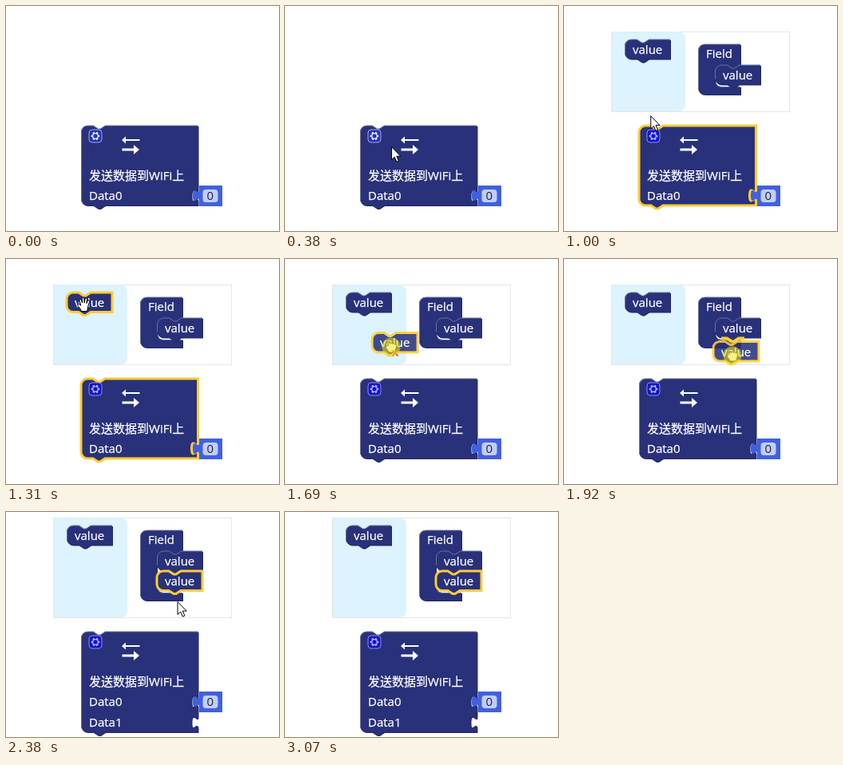
An HTML page for the animation above (3930 ms loop, 342 by 282 pixels).

```html
<!DOCTYPE html>
<html lang="zh-CN">
<head>
<meta charset="utf-8">
<title>Block editor</title>
<style>
html, body { margin: 0; width: 100%; height: 100%; overflow: hidden; background: #fff; }
svg { display: block; width: 342px; height: 282px; }
text { font: 15px "Open Sans", "Noto Sans CJK SC", "Noto Sans CJK", sans-serif; fill: #fff; stroke: #fff; stroke-width: .25px; }
.body { fill: #29317a; }
.dark { fill: #212762; }
.edge { fill: none; stroke: #6a709f; }
.sel .body { stroke: #fc3; stroke-width: 3; }
.sel .edge, .sel .dark { display: none; }
</style>
</head>
<body>
<svg viewBox="0 0 342 282">
  <g id="bubble">
    <rect id="frame" x="59.5" width="223" fill="#fff" stroke="#e6e6e6"/>
    <path id="tray" fill="#ddf3fd"/>
    <g id="spare" class="block"><text x="10" y="18">value</text></g>
    <g id="field" class="block"><text x="178">Field</text></g>
    <g id="first" class="block"><text x="10" y="18">value</text></g>
    <g id="second" class="block sel"><text x="10" y="18">value</text></g>
    <path id="hint" d="M197 99.5h7l6 4h3l6-4h7" fill="none" stroke="#fc3" stroke-width="4"/>
  </g>
  <g id="main" class="block">
    <g transform="translate(104 155)">
      <rect id="plate" width="16" height="16" rx="4"/>
      <g id="gear" fill="none" stroke="#fff">
        <circle cx="8" cy="8" r="4.5" stroke-width="1.6" pathLength="12" stroke-dasharray="1 1" stroke-dashoffset=".5"/>
        <circle cx="8" cy="8" r="3.3" stroke-width="1.3"/>
      </g>
    </g>
    <g fill="#fff">
      <path d="M145 168l5-4.500v3.500h17.500v2h-17.500v3.500z"/>
      <path d="M145.500 178.500h14.500v-4.500l7 6-7 6v-4.500h-14.500z"/>
    </g>
    <text x="104" y="218">发送数据到WiFi上</text>
    <text x="104" y="243">Data0</text>
    <text id="extra" x="104" y="269">Data1</text>
    <path d="M242 225h29v26h-29v-6c0-10-8 8-8-7.500s8 2.500 8-7.500z" fill="#4160e0"/>
    <rect x="246.500" y="230" width="19" height="16" rx="4" fill="#c3cdf6"/>
    <text x="251.500" y="243" style="fill:#1c2540;stroke:none">0</text>
  </g>
  <path id="arrow" d="M.5.5v16l3.700-3.400 2.600 6 2.600-1.100-2.600-5.900h5z" fill="#fff" stroke="#000"/>
  <path id="open" d="M-3 8.500C-4 5-8 2-7.500.3S-5-.5-3.800 1.300L-5.500-5c-.3-2 2-2.300 2.500-.5l1 3.500-.2-5.500c0-1.800 2.400-1.800 2.500 0l.3 5.300 1-4.800c.4-1.700 2.600-1.300 2.400.4l-.6 5.200 1.400-3c.7-1.600 2.700-.8 2.200.9L5 3.500l-.8 5z" fill="#fff" stroke="#000"/>
  <g id="grab">
    <path d="M-3 7C-4 4-7 2-6.500 0s2-2 2.700-1c-1.200-3 1.300-4 2.300-2.500.5-1.800 2.600-1.500 3 0 .8-1.300 2.700-.8 2.800.7C6-3.500 7-2 6.500 0L4.500 7z" fill="#fff" stroke="#222" stroke-width=".8"/>
    <path id="cross" d="M1.500 4.500l7 7m0-7l-7 7" stroke="#e8602a" stroke-width="2"/>
  </g>
  <circle id="ring" r="11.500" fill="#f0e614" fill-opacity=".55"/>
</svg>
<script>
const LOOP = 3930;
const $ = id => document.getElementById(id);
const show = (id, on) => { $(id).style.display = on ? '' : 'none'; };
const move = (id, x, y) => $(id).setAttribute('transform', `translate(${x} ${y})`);
const select = (id, on) => $(id).classList.toggle('sel', on);
const setPath = (id, body, edge) => {
  const [dark, face, light] = $(id).querySelectorAll('.dark, .body, .edge');
  dark.setAttribute('d', body);
  face.setAttribute('d', body);
  light.setAttribute('d', edge);
};

const NOTCH = 'l6 4h3l6-4';
const NOTCH_BACK = 'l-6 4h-3l-6-4';
const SOCKET = 'c0 10-8-8-8 7.500s8-2.500 8 7.500';

// Stack block: rounded left side, notch above, tab below.
function stackBlock(id, x, y, w, h, sockets = []) {
  const top = `a8 8 0 0 1 8-8h7${NOTCH}H${x + w}`;
  const right = sockets.map(s => `V${s}${SOCKET}`).join('');
  setPath(id,
    `M${x} ${y + 8}${top}${right}V${y + h}H${x + 30}${NOTCH_BACK}h-7a8 8 0 0 1-8-8z`,
    `M${x + .5} ${y + h - 7}V${y + 8}${top}`);
}

function fieldBlock(top) {
  setPath('field',
    `M168 ${top + 8}a8 8 0 0 1 8-8H221V${top + 26}H219${NOTCH_BACK}h-7a8 8 0 0 0-8 8` +
    `V93a8 8 0 0 0 8 8H221V111H176a8 8 0 0 1-8-8z`,
    `M168.5 104V${top + 8}a8 8 0 0 1 8-8H221M191 99a8 8 0 0 0 6 2.5H221`);
  $('field').querySelector('text').setAttribute('y', top + 17);
}

for (const block of document.querySelectorAll('.block')) {
  const art = '<path class="dark" transform="translate(1 1)"/><path class="body"/><path class="edge"/>';
  block.insertAdjacentHTML('afterbegin', art);
}
for (const id of ['spare', 'first', 'second']) stackBlock(id, 0, 0, 57, 24.5);

// Pointer moves: start, end, steps, then from, bend and to points.
const MOVES = [
  [70, 450, 6, [242, 248], [176, 207], [111.5, 161]],
  [1000, 1310, 5, [111.5, 161], [103, 100], [97.5, 57]],
  [1460, 1920, 7, [97.5, 57], [94.5, 122.5], [211, 121]],
  [2000, 2150, 3, [211, 121], [216, 120], [217, 118.5]],
  [2230, 2380, 3, [217, 118.5], [217, 115], [214.5, 112]],
  [2460, 2460, 1, [214.5, 112], [214, 118], [214, 124]],
  [2540, 3000, 7, [214, 124], [228, 185], [304, 277]]
];

function pointer(t) {
  const [t0, t1, n, a, b, c] = MOVES.filter(m => m[0] <= t).pop() || MOVES[0];
  const gap = (t1 - t0) / (n - 1) || 1;
  const u = Math.min(n, Math.floor((t - t0) / gap + .03) + 1) / n;
  const v = 1 - u;
  return a.map((p, i) => v * v * p + 2 * u * v * b[i] + u * u * c[i]);
}

function render(t) {
  const within = (a, b) => t >= a && t < b;
  const [x, y] = pointer(t);
  const drag = within(1460, 2230);
  const done = t >= 2230;
  const lift = done ? 25 : 0;

  show('bubble', t >= 770);
  const top = 32.5 - lift;
  $('frame').setAttribute('y', top);
  $('frame').setAttribute('height', 132.5 - top);
  $('tray').setAttribute('d', `M60 ${top}h84a8 8 0 0 1 8 8V124a8 8 0 0 1-8 8H60z`);
  move('spare', 76, 42 - lift);
  select('spare', within(1310, 1460));
  fieldBlock(48 - lift);
  move('first', 189, 74 - lift);

  show('second', drag || done);
  if (done) move('second', 189, 74);
  else move('second', x - 24, y - 17.5);
  $('second').setAttribute('opacity', drag ? .87 : 1);
  show('hint', within(1920, 2230));

  stackBlock('main', 94, 150, 146.5, done ? 126 : 100, done ? [230, 256] : [230]);
  select('main', within(680, 1460));
  show('extra', done);
  $('plate').setAttribute('fill', t < 450 ? '#2533bd' : '#1414d2');
  $('plate').setAttribute('stroke', t < 450 ? '#a5abdc' : '#8a91dc');
  $('gear').setAttribute('opacity', t < 770 ? .95 : .7);

  const open = within(1230, 1460) || within(2230, 2310);
  show('ring', within(680, 770) || drag);
  show('arrow', within(70, 3070) && !open && !drag);
  show('open', open);
  show('grab', drag);
  show('cross', x < 152);
  for (const id of ['ring', 'arrow', 'open', 'grab']) move(id, x, y);
}

function tick() {
  render(performance.now() % LOOP);
  requestAnimationFrame(tick);
}
tick();
</script>
</body>
</html>
```
